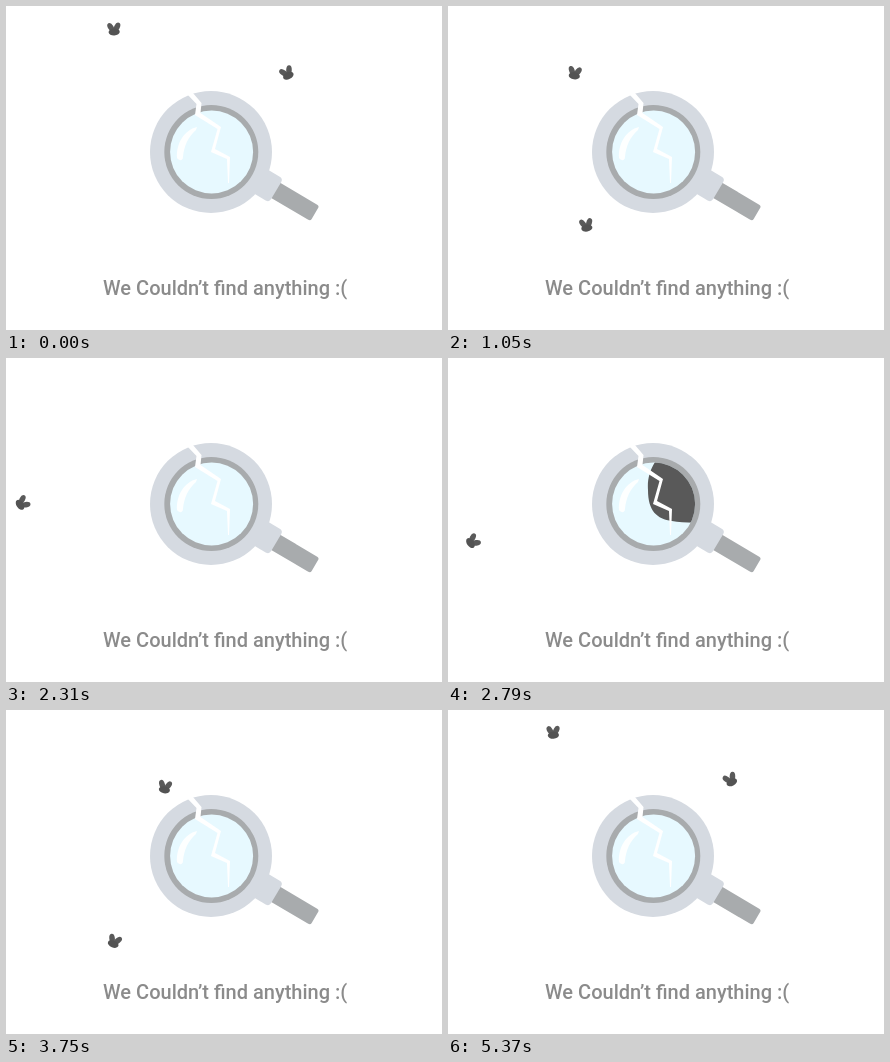
These frames come from a looping animation (436 px wide and 324 px high, 5.4 s). An HTML page:

```html
<!DOCTYPE html>
<html lang="en">
<head>
<meta charset="utf-8">
<title>Nothing found</title>
<style>
  html, body { margin: 0; width: 100%; height: 100%; overflow: hidden; background: #fff; }
  svg { display: block; width: 100vw; height: 100vh; }
  text { font: 500 20px Roboto, Inter, sans-serif; fill: #8b8b8b; }
</style>
</head>
<body>
<svg viewBox="0 0 436 324">
  <defs>
    <clipPath id="lens"><circle cx="205.6" cy="146" r="41.5"/></clipPath>
    <g id="fly" fill="#5a5a5a">
      <ellipse cx="-3.1" cy="-1.8" rx="2.8" ry="4.8" transform="rotate(-28 -3.1 -1.8)"/>
      <ellipse cx="3.1" cy="-1.8" rx="2.8" ry="4.8" transform="rotate(28 3.1 -1.8)"/>
      <ellipse cy="3" rx="5.6" ry="3.5" fill="#535353"/>
    </g>
  </defs>

  <use id="flyA" href="#fly"/>
  <use id="flyB" href="#fly"/>

  <g transform="translate(205.6 146.4) rotate(30.6)">
    <rect x="70" y="-8.8" width="50" height="17.6" rx="2.5" fill="#a8abad"/>
    <rect x="50" y="-13.8" width="25" height="27.6" rx="4" fill="#d5dae1"/>
  </g>
  <circle cx="205" cy="146" r="61" fill="#d5dae1"/>
  <circle cx="205.3" cy="146" r="47" fill="#a8abad"/>
  <circle cx="205.6" cy="146" r="41.5" fill="#e7f9ff"/>
  <g clip-path="url(#lens)">
    <path id="closeUp" fill="#595959" d="M214 95C203 107 199 119 200 132C200 153 209 161 224 163C238 165 262 167 280 158C294 148 294 112 282 96C268 78 228 78 214 95Z"/>
  </g>
  <path fill="#fff" opacity=".9" d="M191 121C178 124 170 138 171 152C173 155 177 155 177 151C178 140 182 131 190 124Z"/>
  <path fill="#fff" d="M180 87L187 87L195.5 97L194.5 107L215 121L209 143L224 151L223 177L222 177L221 153L205 146L211.5 123L189 109L190.5 98Z"/>
  <text x="219.2" y="289.4" text-anchor="middle">We Couldn’t find anything :(</text>
</svg>
<script>
const LOOP = 5400, STEP = 30;
const byId = id => document.getElementById(id);

// Closed routes; the waypoints are evenly spaced in time
const routeA = [
  [108, 23], [124, 112], [141, 222], [228, 200], [246, 150],
  [238, 124], [216, 90], [156, 77], [116, 97], [38, 69]
];
const routeB = [[281, 67], [148, 63], [34, 104], [22, 177], [86, 229], [244, 209]];

function pointOn(route, phase) {
  const n = route.length, i = Math.floor(phase * n), u = phase * n - i;
  const at = k => route[(i + k + n) % n];
  return [0, 1].map(axis => {
    const [p, a, b, q] = [-1, 0, 1, 2].map(k => at(k)[axis]);
    const m0 = (b - p) / 2, m1 = (q - a) / 2, d = b - a;
    return a + u * (m0 + u * (3 * d - 2 * m0 - m1 + u * (m0 + m1 - 2 * d)));
  });
}

const wave = (phase, mid, swing, shift) =>
  mid + swing * Math.sin(2 * Math.PI * (phase - shift));

function place(id, [x, y], turn = 0) {
  byId(id).setAttribute("transform", `translate(${x} ${y}) rotate(${turn})`);
}

function draw(ms) {
  const t = Math.floor((ms % LOOP) / STEP) * STEP, phase = t / LOOP;
  place("flyA", pointOn(routeA, phase), wave(phase, 0, 10, 0.45));
  place("flyB", pointOn(routeB, phase), wave(phase, 15, 42, 0.22));

  // The magnified fly crosses the lens from lower right to upper left
  const away = (2790 - t) / 460;
  place("closeUp", [60 * away, 95 * away]);
}

const start = performance.now();
function tick() {
  draw(performance.now() - start);
  requestAnimationFrame(tick);
}
tick();
</script>
</body>
</html>
```
